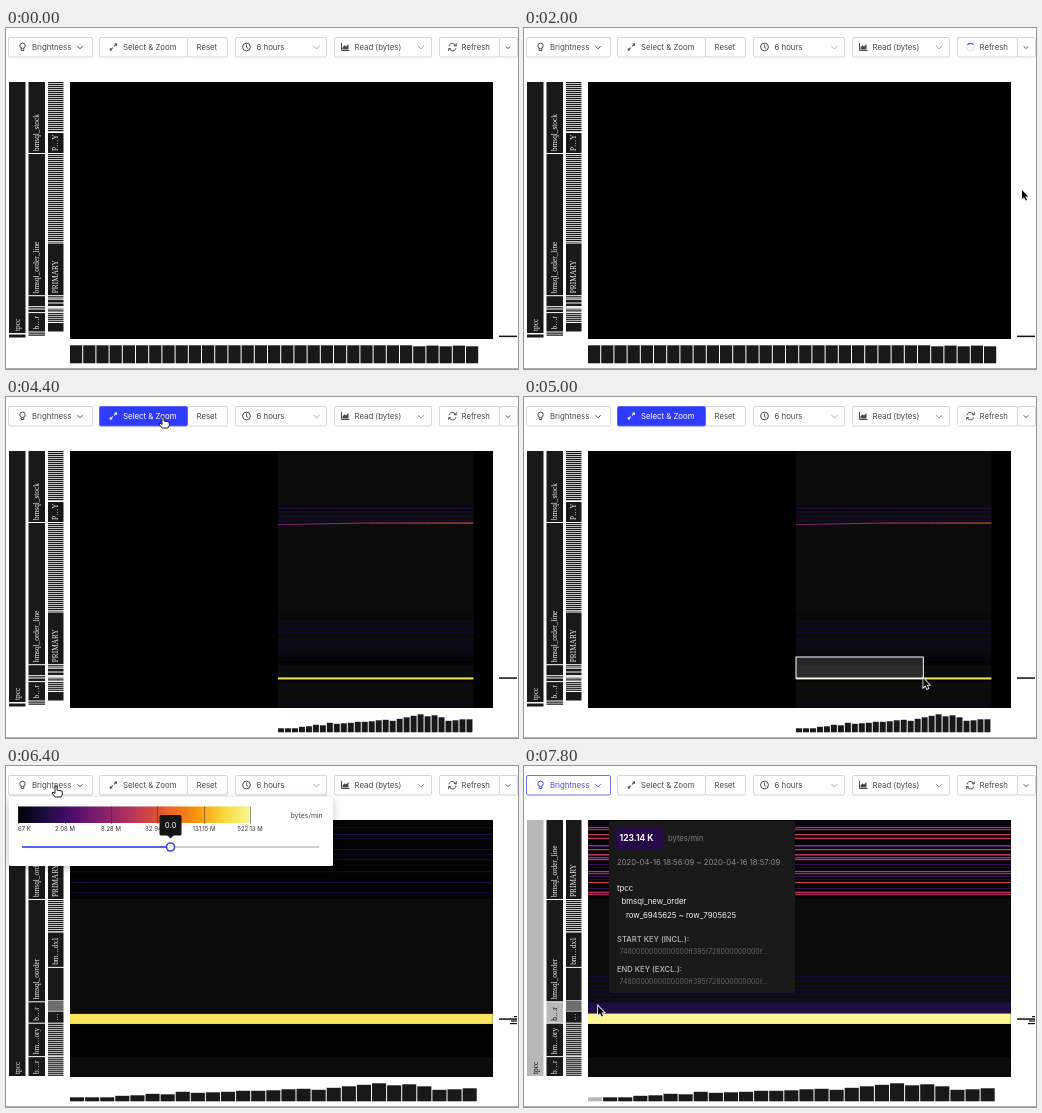
Animation of 512x341 px, one loop 8 s. Source, as an HTML page with a canvas:

```html
<!DOCTYPE html>
<html lang="en">
<head>
<meta charset="utf-8">
<title>Key heatmap</title>
<style>
html, body { margin: 0; width: 100%; height: 100%; overflow: hidden; background: #fff; }
canvas { display: block; width: 512px; height: 341px; }
</style>
</head>
<body>
<canvas id="stage"></canvas>
<script>
const LOOP = 8000, STEP = 200;
const canvas = document.getElementById('stage');
const c = canvas.getContext('2d');
const ratio = window.devicePixelRatio || 1;
canvas.width = 512 * ratio;
canvas.height = 341 * ratio;

const INK = '#484848', BLUE = '#3440f5', DARK = '#191919', LIT = '#b8b8b8';
const SANS = 'Inter, "Open Sans", sans-serif', SERIF = '"Liberation Serif", serif';
const CHART = { x: 64, y: 54, w: 423, h: 257 };

const clamp = v => Math.max(0, Math.min(1, v));
const ramp = (t, a, b) => clamp((t - a) / (b - a));
const ease = p => p * p * (3 - 2 * p);
const lerp = (a, b, p) => a + (b - a) * p;
const within = (t, a, b) => t >= a && t < b;
function track(keys, t) {
  const i = keys.findIndex(k => k[0] > t);
  if (i < 0) return keys[keys.length - 1].slice(1);
  if (i === 0) return keys[0].slice(1);
  const a = keys[i - 1], b = keys[i], p = ramp(t, a[0], b[0]);
  return a.slice(1).map((v, n) => lerp(v, b[n + 1], p));
}
function seeded(seed) {
  return () => (seed = (seed * 16807) % 2147483647) / 2147483647;
}

// Drawing helpers
function rect(x, y, w, h, color) {
  c.fillStyle = color;
  c.fillRect(x, y, w, h);
}
function text(str, x, y, size = 7.8, color = INK, weight = 400, family = SANS) {
  c.font = `${weight} ${size}px ${family}`;
  c.fillStyle = color;
  c.fillText(str, x, y);
}
function line(points, color, width = 1, close = false) {
  c.beginPath();
  points.forEach(([x, y]) => c.lineTo(x, y));
  if (close) c.closePath();
  c.strokeStyle = color;
  c.lineWidth = width;
  c.stroke();
}
function shape(points, color) {
  c.beginPath();
  points.forEach(([x, y]) => c.lineTo(x, y));
  c.fillStyle = color;
  c.fill();
}
function arc(x, y, r, color, from = 0, to = 7, width = 1) {
  c.beginPath();
  c.arc(x, y, r, from, Math.min(to, from + 2 * Math.PI));
  c.strokeStyle = color;
  c.lineWidth = width;
  c.stroke();
}
function box(x, y, w, h, fill, stroke, r = 1.5) {
  c.beginPath();
  c.roundRect(x, y, w, h, r);
  c.fillStyle = fill;
  c.fill();
  if (stroke) { c.strokeStyle = stroke; c.lineWidth = 1; c.stroke(); }
}
function card(x, y, w, h) {
  c.save();
  c.shadowColor = 'rgba(0,0,0,.25)';
  c.shadowBlur = 8 * ratio;
  c.shadowOffsetY = 2 * ratio;
  box(x, y, w, h, '#fff');
  c.restore();
}
const chevron = (x, y, color, s = 2.6) => line([[x - s, y - s / 2], [x, y + s / 2], [x + s, y - s / 2]], color, 1);

// Colour scale: brightness shifts the logarithmic level
const SCALE = ['#000004', '#1b0c41', '#4a0c6b', '#781c6d', '#a52c60', '#cf4446', '#ed6925', '#fb9b06', '#f7d93d', '#fcf795']
  .map(h => [1, 3, 5].map(i => parseInt(h.slice(i, i + 2), 16)));
const gain = brightness => brightness / 14;
function heat(level, brightness) {
  const v = clamp(level + gain(brightness)) * (SCALE.length - 1);
  const i = Math.min(SCALE.length - 2, Math.floor(v));
  return `rgb(${SCALE[i].map((a, n) => Math.round(lerp(a, SCALE[i + 1][n], v - i)))})`;
}

// Key ranges, in rows of the full view: [start, end, label]; '=' means fine stripes
const COLUMNS = [
  { x: 3, w: 16.5, parts: [[54, 306, 'tpcc'], [306.5, 310.5, '']] },
  { x: 22.5, w: 16.5, parts: [
    [54, 126, 'bmsql_stock'], [126, 268.2, 'bmsql_order_line'], [268.2, 279.2, 'bmsql_oorder'],
    [279.2, 281.5, 'b…r'], [281.5, 285.1, 'bm…ory'], [285.1, 304.5, 'b…r'], [304.5, 309, '=']] },
  { x: 42, w: 15.5, parts: [
    [54, 105, '='], [105, 126, 'P…Y'], [126, 215.5, '='], [215.5, 268.2, 'PRIMARY'], [268.2, 271.7, '='],
    [271.7, 275.5, 'bm…dx1'], [275.5, 279.1, 'PRIMARY'], [279.1, 280.2, '='], [280.2, 281.5, '…'],
    [281.5, 285.1, '='], [285.1, 295, '='], [295, 304.5, '']] }
];
const ZOOM = 9.3, ZOOM_TOP = 259.6;
const zoomedRow = y => ZOOM_TOP + (y - CHART.y) / ZOOM;

const rnd = seeded(77);
const bands = [];
for (let y = 216; y < 259; y += 2 + rnd() * 2) bands.push([y, 0.8, 0.03 + rnd() * 0.08]);
for (let y = 109; y < 125; y += 1.8) bands.push([y, 0.9, 0.03 + rnd() * 0.1]);
for (let y = 56; y < 131; y += 3) bands.push([zoomedRow(y), 0.12, -0.4 + rnd() * 0.22]);
[61, 63, 68, 72, 79, 83, 88, 91, 93, 105, 107, 116, 126, 128].forEach((y, i) =>
  bands.push([zoomedRow(y), 0.13, [0.08, 0.03, 0.11][i % 3]]));
for (let y = 210; y < 235; y += 4.5) bands.push([zoomedRow(y), 0.14, -0.33]);
bands.push([279.2, 1.26, -0.29], [305, 0.8, 0.06], [307, 0.7, 0.04]);

const TRAFFIC = [4, 4, 4, 5.5, 6, 7.5, 7, 9.5, 8.5, 9, 9.5, 10.5, 10.5, 11, 12, 12.5, 11.5, 13.5, 15, 16.5, 18, 16, 17, 15, 11.5, 12, 13, 13];

function viewAt(t) {
  const p = ease(ramp(t, 5200, 5600));
  const loaded = t >= 2600, updated = t >= 3400;
  return {
    p, loaded,
    x: !loaded ? 64 : updated ? lerp(272, 64, p) : 301,
    pitch: !loaded ? 13.2 : updated ? lerp(6.98, 15.1, p) : 7.44,
    count: !loaded ? 32 : updated ? 28 : 25,
    row: y => CHART.y + (y - lerp(CHART.y, ZOOM_TOP, p)) * lerp(1, ZOOM, p)
  };
}

function drawHeatmap(v, brightness) {
  c.save();
  c.beginPath();
  c.rect(CHART.x, CHART.y, CHART.w, CHART.h);
  c.clip();
  rect(CHART.x, CHART.y, CHART.w, CHART.h, '#000');
  if (v.loaded) {
    const w = v.count * v.pitch;
    const strip = (y, h, color, min = 0) => rect(v.x, v.row(y), w, Math.max(min, v.row(y + h) - v.row(y)), color);
    strip(54, 257, '#0c0c0c');
    strip(259.6, 8.5, '#030303');
    strip(281.5, 3.6, '#020202');
    for (const [y, h, level] of bands)
      if (level + gain(brightness) > 0.02) strip(y, h, heat(level, brightness));
    for (let i = 0; i < v.count; i++)
      rect(v.x + i * v.pitch, v.row(127 - Math.min(1.5, i / 8)), v.pitch, 1.1, heat(0.3 + i * 0.012, brightness));
    if (v.p > 0.5) strip(280.36, 0.12, heat(0.2, brightness));
    strip(280.46, 1.07, heat(0.93, brightness), 2);
  }
  c.restore();
}

function drawKeyAxis(v, hovering) {
  c.save();
  c.beginPath();
  c.rect(0, CHART.y, CHART.x, CHART.h);
  c.clip();
  COLUMNS.forEach(({ x, w, parts }, col) => {
    for (const [from, to, label] of parts) {
      const top = Math.max(CHART.y, v.row(from)), bottom = Math.min(311, v.row(to)) - 1;
      if (bottom <= top) continue;
      const lit = hovering && (col === 0 || col === 1 && from === 279.2);
      if (label === '=') {
        for (let y = top; y < bottom; y += 2) rect(x, y, w, Math.min(1.25, bottom - y), DARK);
        continue;
      }
      rect(x, top, w, bottom - top, lit ? LIT : DARK);
      c.font = `7.3px ${SERIF}`;
      if (c.measureText(label).width > bottom - top) continue;
      c.save();
      c.translate(x + w / 2 + 2.5, bottom - 2);
      c.rotate(-Math.PI / 2);
      text(label, 0, 0, 7.3, lit ? '#000' : '#f2f2f2', 400, SERIF);
      c.restore();
    }
  });
  c.restore();
}

function drawTotals(v, hovering) {
  for (let i = 0; i < v.count; i++) {
    const x = v.x + i * v.pitch;
    if (x + v.pitch > 481 || x < 60) continue;
    const h = v.loaded ? TRAFFIC[i] : i < 26 ? 18 : 17 + (i % 2) * 0.7;
    rect(x, 335.3 - h, v.pitch - 1, h, hovering && i === 0 ? LIT : DARK);
  }
  const y = v.loaded ? v.row(281) : 308.3;
  rect(493, y - 0.7, 18, 1.5, '#111');
  if (v.p > 0.5) {
    rect(508, 250, 3, 1.2, '#111');
    rect(505, 254.4, 6, 1.2, '#111');
    rect(504, 257, 7, 1.2, '#111');
  }
}

function drawToolbar(t) {
  const border = '#d4d4d4';
  const button = (x, right, fill = '#fff', stroke = border) => box(x + 0.5, 9.5, right - x - 1, 19.5, fill, stroke);
  const tint = t >= 7400 ? '#4350dc' : INK;

  button(2, 87, '#fff', t >= 7400 ? '#6a74e8' : border);
  arc(16.5, 17.8, 2.7, tint);
  line([[15.2, 20.5], [15.2, 22.5], [17.8, 22.5], [17.8, 20.5]], tint);
  text('Brightness', 26, 22.2, 7.8, tint);
  chevron(74, 19.5, tint);

  button(181, 222);
  const fade = ramp(t, 5600, 6200);
  const active = within(t, 4200, 6000);
  button(93, 182, active ? `rgba(47,60,255,${1 - fade * 0.55})` : '#fff', active ? '#5964f8' : border);
  const label = !active ? INK : fade > 0 ? '#8085b8' : '#fff';
  line([[104.2, 22.2], [106.8, 19.6]], label, 1.1);
  line([[108, 18.4], [110.6, 15.8]], label, 1.1);
  shape([[103.8, 19.8], [106.6, 22.6], [103.8, 22.6]], label);
  shape([[108.2, 15.4], [111, 15.4], [111, 18.2]], label);
  text('Select & Zoom', 117, 22.2, 7.8, label);
  text('Reset', 190.5, 22.2);

  button(229, 321);
  arc(240.5, 19, 3.9, INK);
  line([[240.5, 16.5], [240.5, 19.5], [242.3, 20.5]], INK, 0.9);
  text('6 hours', 250.5, 22.2);
  chevron(310.5, 19.5, '#aaa', 3);

  button(328, 426);
  line([[335.5, 15], [335.5, 22.5], [343.5, 22.5]], INK);
  shape([[336.5, 21.5], [336.5, 19.5], [338.5, 17.2], [340, 18.5], [342.5, 16], [342.5, 21.5]], INK);
  text('Read (bytes)', 348.5, 22.2);
  chevron(415, 19.5, '#aaa', 3);

  button(433, 494);
  button(493, 512, '#fff', within(t, 800, 1800) ? '#7c85e8' : border);
  if (within(t, 400, 3000)) {
    const turn = t / 1000 * 2 * Math.PI * 0.8;
    arc(446.5, 19.2, 3.9, '#dcdff8');
    arc(446.5, 19.2, 3.9, '#4e58d8', turn, turn + 1.8, 1.1);
  } else if (within(t, 3000, 3200)) {
    arc(446.5, 19.2, 3.9, '#dedede');
  } else {
    arc(446.5, 19.2, 3.6, INK, 0.3, 2.9);
    arc(446.5, 19.2, 3.6, INK, 3.4, 6.0);
    line([[450.4, 15.3], [450.2, 18], [447.9, 17.6]], INK, 0.9);
    line([[442.6, 23], [442.8, 20.4], [445.1, 20.8]], INK, 0.9);
  }
  text('Refresh', 455.5, 22.2);
  chevron(502, 19.5, INK, 2.2);
}

function drawRefreshMenu(t) {
  card(442, 30, 69.5, 167);
  text('Auto Refresh', 449, 46.3, 7.8, '#888');
  rect(447, 53, 59, 20, '#f1f5fe');
  text('Off', 454, 66, 7.8, '#39449a');
  rect(442, 75, 69.5, 0.8, '#eaeaea');
  if (t >= 1200) rect(442, 155, 69.5, 19.5, '#efefef');
  ['15 seconds', '30 seconds', '1 minute', '2 minutes', '5 minutes', '10 minutes']
    .forEach((s, i) => text(s, 454, 90.5 + i * 19.4));
}

function drawBrightnessPanel(b) {
  card(3, 31, 324, 69);
  for (let x = 0; x < 232; x++) rect(12 + x, 40.5, 1.1, 16.5, heat(x / 232, b));
  const labels = ['67 K', '2.08 M', '8.28 M', '32.94 M', '131.15 M', '522.13 M'];
  [12, 59, 105, 151, 198, 244].forEach((x, i) => {
    rect(x, 40.5, 0.7, 17.5, 'rgba(40,40,40,.7)');
    c.textAlign = i ? 'center' : 'left';
    text(labels[i], x, 65, 6, '#333');
  });
  c.textAlign = 'left';
  text('bytes/min', 284.5, 52, 6.9);
  const x = 16 + 297 * (b + 6) / 12;
  rect(16, 80, 297, 2, '#cfcfcf');
  rect(16, 80, x - 16, 2, '#5863f0');
  c.beginPath();
  c.arc(x, 81, 4, 0, 7);
  c.fillStyle = '#fff';
  c.fill();
  arc(x, 81, 4, '#3944cc', 0, 7, 1.6);
  box(x - 11, 49, 22, 20.5, '#151515');
  shape([[x - 3.5, 69], [x + 3.5, 69], [x, 72.5]], '#151515');
  c.textAlign = 'center';
  text(b.toFixed(1), x, 62, 7.8, '#fff');
  c.textAlign = 'left';
}

function drawTooltip() {
  box(85, 55, 186, 172, '#191919', null, 2);
  rect(91, 61, 48, 22, '#260a4a');
  text('123.14 K', 95.5, 75.3, 8.5, '#fff', 700);
  text('bytes/min', 144, 75, 7.6, '#808080');
  text('2020-04-16 18:56:09 ~ 2020-04-16 18:57:09', 93, 99, 7.7, '#909090');
  text('tpcc', 93, 125, 7.8, '#f0f0f0');
  text('bmsql_new_order', 97.5, 138.3, 7.8, '#f0f0f0');
  text('row_6945625 ~ row_7905625', 102, 151.6, 7.8, '#f0f0f0');
  [['START KEY (INCL.):', 176], ['END KEY (EXCL.):', 205.5]].forEach(([title, y]) => {
    text(title, 93, y, 7.6, '#a8a8a8', 600);
    text('7480000000000000ff395f728000000000f…', 95.5, y + 12, 6.9, '#666');
  });
}

function drawCursor(t) {
  if (t < 200) return;
  const [x, y] = track([
    [200, 440, 60], [400, 462, 20], [600, 502, 20], [800, 502, 20], [1200, 498, 162], [3600, 498, 162],
    [4200, 157, 20], [4400, 157, 20], [4600, 272, 260], [5200, 463, 292], [5800, 463, 292],
    [6200, 50, 20], [6400, 50, 20], [6600, 171, 84], [6800, 222, 84], [7000, 273, 84],
    [7200, 312, 84], [7400, 190, 160], [7600, 74, 240]], t);
  const hand = within(t, 400, 1600) || within(t, 4200, 4600) || within(t, 6400, 7400);
  const outline = hand
    ? [[-1, 0], [1, 0], [1, 4], [6, 5], [6.5, 8], [5, 11], [-1, 11], [-4, 7], [-3, 6], [-1, 7.5]]
    : [[0, 0], [0, 9], [2, 7.2], [3.7, 10.5], [5, 9.9], [3.5, 6.6], [6.2, 6.4]];
  const points = outline.map(([a, b]) => [x + a, y + b]);
  if (!hand) line(points, '#fff', 1.6, true);
  shape(points, hand ? '#fff' : '#000');
  if (hand) line(points, '#222', 1, true);
}

function drawSelection(t) {
  const p = ramp(t, 4600, 5200);
  const w = 191 * p, h = 32 * p;
  rect(272, 260, w, h, 'rgba(119,119,119,.3)');
  c.strokeStyle = '#fff';
  c.lineWidth = 1;
  c.strokeRect(272, 260, w, h);
}

function draw(t) {
  c.setTransform(ratio, 0, 0, ratio, 0, 0);
  rect(0, 0, 512, 341, '#fff');
  const view = viewAt(t), hovering = t >= 7600;
  const [brightness] = track([[6600, 0], [6800, 2.1], [7000, 4.2], [7200, 5.8]], t);
  drawHeatmap(view, brightness);
  drawKeyAxis(view, hovering);
  drawTotals(view, hovering);
  rect(0, 340, 512, 1, '#b0b0b0');
  drawToolbar(t);
  if (within(t, 800, 1800)) drawRefreshMenu(t);
  if (within(t, 4800, 5200)) drawSelection(t);
  if (within(t, 6400, 7400)) drawBrightnessPanel(brightness);
  if (hovering) drawTooltip();
  drawCursor(t);
}

function tick(now) {
  draw(Math.floor(now % LOOP / STEP) * STEP);
  requestAnimationFrame(tick);
}
tick(performance.now());
</script>
</body>
</html>
```
